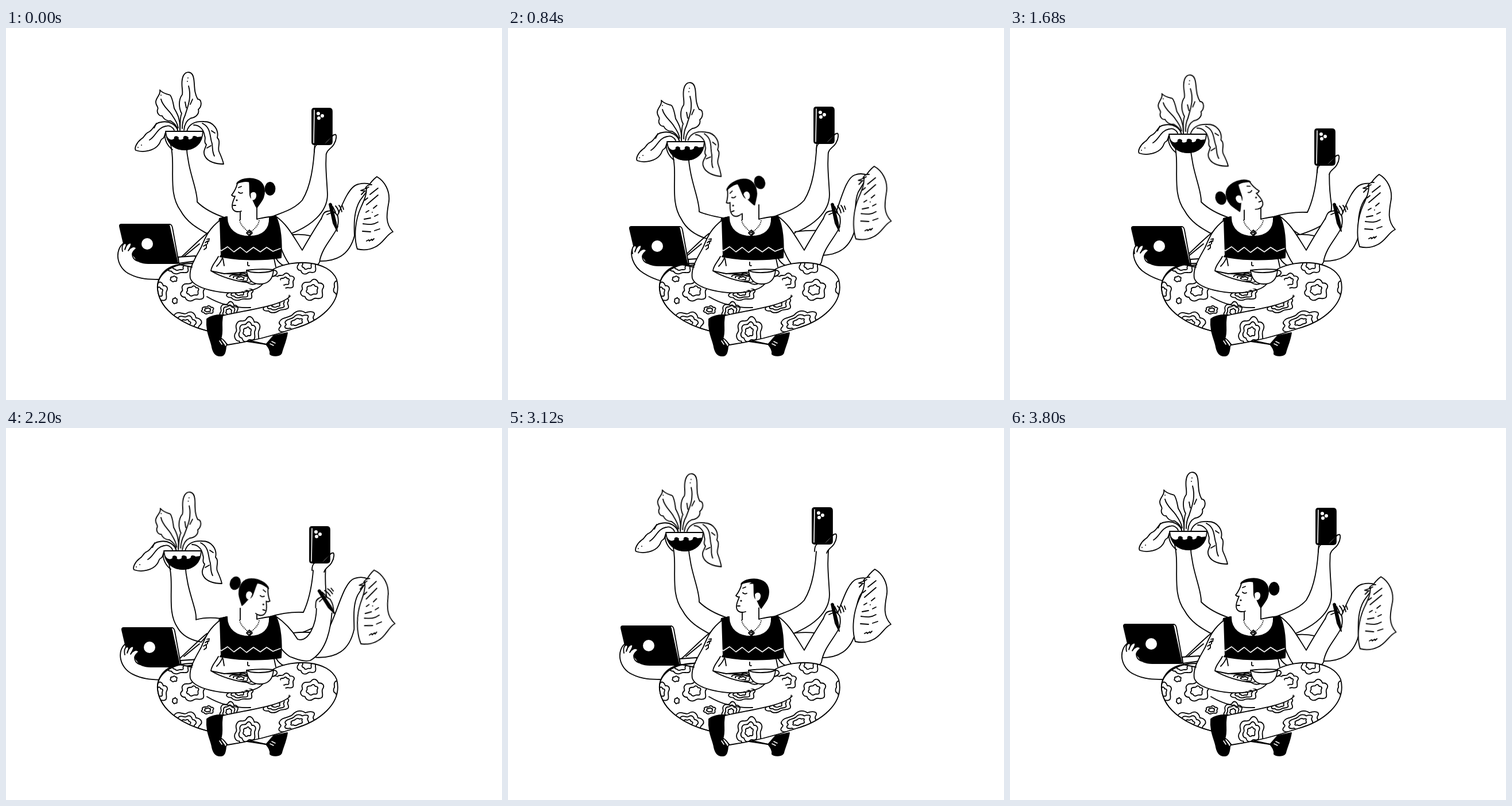
Animation of 864 by 648 pixels, one loop 3.84 s. Source, as an HTML page without scripts:

```html
<!DOCTYPE html>
<html lang="en">
<head>
<meta charset="utf-8">
<title>Six arms at work</title>
<style>
html, body { margin: 0; width: 100%; height: 100%; overflow: hidden; background: #fff; }
svg { display: block; width: 864px; height: 648px; }
path, ellipse, circle { fill: #fff; stroke: #000; stroke-width: 1.8; stroke-linecap: round; stroke-linejoin: round; }
.line { fill: none; }
.ink { fill: #000; }
.skin { stroke: none; }
.chalk { fill: none; stroke: #fff; stroke-width: 1.6; }
#blob { fill: none; vector-effect: non-scaling-stroke; }

.move { animation: 3840ms ease-in-out infinite; }
.plant { animation-name: plant; }
.plant-arm { animation-name: plant-arm; }
.tall { animation-name: tall; transform-origin: 308px 180px; }
.droop { animation-name: droop; transform-origin: 340px 175px; }
.phone { animation-name: phone; }
.phone-arm { animation-name: phone-arm; }
.paper { animation-name: paper; transform-origin: 640px 268px; }
.paper-arm { animation-name: paper-arm; }
.laptop { animation-name: laptop; }
.laptop-arm { animation-name: laptop-arm; }
.pen { animation-name: pen; transform-origin: 571px 330px; }
.pen-arm { animation-name: pen-arm; }
.head { animation-name: head; transform-origin: 421px 330px; }
.bun { animation-name: bun; }
.left { animation-name: left; animation-timing-function: step-end; }
.right { animation-name: right; animation-timing-function: step-end; }

:root {
  --plant-up: path("M286 200C297 240 280 285 304 318C316 340 336 350 350 358L383 331C365 325 345 315 333 303C334 280 316 250 314 200");
  --plant-mid: path("M286 218C297 255 280 300 302 333C312 353 330 362 346 367L380 332C364 329 346 326 333 320C334 298 316 266 314 218");
  --plant-down: path("M283 234C295 272 278 318 299 348C308 364 325 370 340 373L374 332C360 330 345 330 331 334C333 314 314 284 312 234");
  --phone-up: path("M538 200C536 240 531 276 516 300C500 318 478 322 455 332L497 358C530 345 560 322 560 290C559 262 555 240 559 205");
  --phone-down: path("M536 236C534 272 528 300 518 321C500 320 478 323 458 329L505 360C535 350 562 340 560 308C557 288 555 268 557 240");
  --paper-low: path("M500 360C525 358 542 364 556 371C575 345 590 276 614 272C622 270 630 270 637 273L617 300C606 318 606 340 607 362C598 396 575 408 540 406");
  --paper-high: path("M500 355C525 352 542 352 556 354C575 328 584 262 604 256C612 253 621 254 627 257L610 286C602 306 607 328 606 344C598 384 575 397 540 396");
  --laptop-out: path("M206 374C188 386 192 418 216 429C234 438 250 438 268 438");
  --laptop-in: path("M220 380C209 392 218 416 236 427C247 434 257 438 268 441");
  --pen-rest: path("M470 328C490 342 500 362 516 387C530 362 541 345 553 326L578 346C570 365 550 382 546 408C540 422 500 420 494 412C488 404 482 392 478 380");
  --pen-up: path("M470 328C485 338 498 352 508 368C526 374 541 344 541 311L568 318C566 346 560 388 530 405C518 408 505 402 494 398C488 394 482 388 478 382");
}
@keyframes plant {
  0%, 13%, 100% { transform: none; }
  22% { transform: translate(-1px, 18px); }
  31%, 44% { transform: translate(-1px, 5px); }
  57.5% { transform: translate(-3px, 34px); }
  67.5% { transform: translate(-3px, 20px); }
  76%, 82% { transform: translate(-3px, 2px); }
}
@keyframes plant-arm {
  0%, 13%, 31%, 44%, 76%, 100% { d: var(--plant-up); }
  22%, 67.5% { d: var(--plant-mid); }
  57.5% { d: var(--plant-down); }
}
@keyframes tall {
  0%, 22%, 100% { transform: none; }
  43% { transform: rotate(-2deg); }
  57% { transform: rotate(3deg); }
  67% { transform: rotate(-1deg); }
  81% { transform: rotate(3deg); }
}
@keyframes droop {
  0%, 57%, 100% { transform: none; }
  22% { transform: rotate(6deg); }
  43% { transform: rotate(-2deg); }
  67%, 81% { transform: rotate(4deg); }
}
@keyframes phone {
  0%, 100% { transform: none; }
  22%, 28% { transform: translateY(-2px); }
  42% { transform: translate(-2px, 36px); }
  57.3% { transform: translate(-4px, 32px); }
  66.7% { transform: translate(-4px, -3px); }
  82% { transform: translate(-3px, -1px); }
}
@keyframes phone-arm {
  0%, 28%, 66.7%, 100% { d: var(--phone-up); }
  42%, 57.3% { d: var(--phone-down); }
}
@keyframes paper {
  0%, 100% { transform: none; }
  22% { transform: translate(-8px, -18px) rotate(-1deg); }
  43.75% { transform: translate(-3px, -4px); }
  57.3% { transform: translate(-4px, -11px) rotate(-5deg); }
  66.7% { transform: translate(-10px, -20px) rotate(-4deg); }
  81.25% { transform: translate(-7px, -13px); }
  98% { transform: rotate(2deg); }
}
@keyframes paper-arm {
  0%, 44%, 98%, 100% { d: var(--paper-low); }
  22%, 67% { d: var(--paper-high); }
}
@keyframes laptop {
  0%, 15%, 100% { transform: none; }
  21.5%, 45% { transform: translate(14px, 4px); }
  57.3% { transform: translate(4px, 6px); }
  66.7% { transform: translate(-1px, 6px); }
  81.25% { transform: translate(-1px, 3px); }
}
@keyframes laptop-arm {
  0%, 15%, 63%, 100% { d: var(--laptop-out); }
  21.5%, 45% { d: var(--laptop-in); }
}
@keyframes pen {
  0%, 46%, 66%, 100% { transform: none; }
  54%, 59% { transform: translate(-12px, -27px) rotate(-20deg); }
}
@keyframes pen-arm {
  0%, 46%, 66%, 100% { d: var(--pen-rest); }
  54%, 59% { d: var(--pen-up); }
}
@keyframes head {
  0%, 6%, 100% { transform: none; }
  21.9%, 25% { transform: rotate(-22deg); }
  31% { transform: rotate(-4deg); }
  41%, 45% { transform: rotate(-20deg); }
  57.3% { transform: rotate(18deg); }
  66.7%, 70% { transform: none; }
  81.25% { transform: translate(4px, 1px); }
  90% { transform: none; }
}
@keyframes bun {
  0%, 25%, 89%, 100% { transform: none; }
  38%, 70% { transform: translateX(-78px); }
  81.25% { transform: translateX(-38px); }
}
@keyframes left { 0%, 78% { opacity: 1; } 31% { opacity: 0; } }
@keyframes right { 0%, 78% { opacity: 0; } 31% { opacity: 1; } }
</style>
</head>
<body>
<svg viewBox="0 0 864 648">
  <defs>
    <path id="blob" d="M-18-8C-14-16-6-10-2-14C4-21 10-16 12-11C18-12 24-8 20-2C16 2 22 8 18 13C12 17 8 12 3 15C-4 20-11 17-13 11C-20 11-23 5-19 1C-15-2-20-4-18-8Z"/>
    <g id="rings">
      <use href="#blob"/>
      <use href="#blob" transform="scale(.66)"/>
      <use href="#blob" transform="scale(.32)"/>
    </g>
    <g id="pair">
      <use href="#blob"/>
      <use href="#blob" transform="scale(.5)"/>
    </g>
    <g id="face">
      <path class="skin" d="M403 271L394 310 410 319 435 311 440 270Z"/>
      <path d="M403 271C401 279 397 286 393 291C395 293 397 294 399 293C397 299 394 303 394 310C394 318 400 322 410 319"/>
      <path class="ink" d="M402 271C407 263 424 260 436 264C449 268 453 282 448 296C445 303 440 308 437 313C434 309 432 303 430 299C422 294 426 284 424 268C417 266 409 268 402 271Z"/>
      <path class="skin" d="M426 289C430 283 437 286 436 293C435 299 431 301 427 299Z"/>
      <path class="line" d="M405 286Q408 289 412 287M405 278L410 276M396 309H400"/>
      <circle class="ink" cx="402" cy="300" r=".7"/>
    </g>
    <path id="thigh" d="M302 412C274 416 262 438 264 455C268 494 312 518 352 528L453 551 480 520 500 440 440 424 380 428Z"/>
    <path id="shin" d="M466 420C500 402 562 404 576 438C587 480 545 512 500 524C460 538 420 547 386 552L374 540 377 501C425 490 480 484 495 467"/>
    <clipPath id="in-thigh"><use href="#thigh"/></clipPath>
    <clipPath id="in-shin"><use href="#shin"/></clipPath>
  </defs>

  <!-- phone -->
  <path class="move phone-arm" d="M538 200"/>
  <g class="move phone">
    <path class="skin" d="M538 196H572L558 219 538 215Z"/>
    <path class="line" d="M542 203C538 205 537 211 537 216M572 186C577 183 576 195 571 203C566 211 561 210 558 219"/>
    <path class="ink" d="M537 140H563Q568 140 568 145V198Q568 203 563 203H537Q533 203 533 199V144Q533 140 537 140Z"/>
    <path class="chalk" d="M537 143L536 200" stroke-width="1"/>
    <circle class="skin" cx="544" cy="149" r="3"/><circle class="skin" cx="551" cy="153" r="3"/><circle class="skin" cx="545" cy="157" r="3"/>
    <path d="M571 186C565 192 558 195 554 203"/>
  </g>

  <!-- plant -->
  <path class="move plant-arm" d="M286 200"/>
  <g class="move plant">
    <path class="line" d="M277 185C276 196 282 206 290 212"/>
    <g class="move tall">
      <path d="M303 178C304 160 299 150 293 140C291 130 290 122 286 117C280 115 273 114 268 108C270 116 262 120 261 128C260 135 267 138 264 142C262 149 268 154 272 153C275 160 282 162 287 162C293 166 298 170 299 178"/>
      <path class="line" d="M270 124C273 137 285 144 290 153C295 160 299 168 300 174"/>
      <path d="M310 178C311 165 316 160 322 157C332 156 337 148 335 142C342 136 341 124 334 124C327 112 329 100 327 88C325 75 314 74 309 83C303 95 309 108 307 116C300 125 301 140 306 149C302 158 304 168 303 178"/>
      <path class="line" d="M318 101C324 122 316 138 312 152C308 160 307 167 307 175M325 124L321 133M312 129L314 139"/>
      <path class="line" d="M317 87V87.1M316 93V93.1M270 117V117.1" stroke-width="2.2"/>
    </g>
    <path d="M300 182C298 168 284 161 270 164C258 165 258 176 249 181C241 184 242 190 236 193C228 199 223 209 226 213C240 218 259 213 266 203C270 199 268 194 274 192C277 189 276 184 279 181"/>
    <path class="line" d="M278 171C263 174 261 189 250 195M279 171C284 169 290 172 293 178M262 166L258 174M236 204V204.1M230 208V208.1"/>
    <g class="move droop">
      <path d="M315 180C318 167 330 162 345 163C362 163 371 178 368 191C375 198 368 208 371 215C375 224 378 231 379 237C365 237 352 233 347 224C342 215 347 211 349 203C343 199 349 193 346 188C345 178 338 169 327 169"/>
      <path class="line" d="M342 166C357 173 355 189 358 198C361 206 358 214 363 223M358 179L364 183M350 209L357 205"/>
    </g>
    <path d="M278 180H343C342 201 329 212 311 212C293 212 280 201 278 180Z"/>
    <path class="ink" d="M280 190C284 196 290 197 294 193C292 189 297 188 300 191C298 196 306 197 310 193C308 188 314 188 317 191C315 196 322 196 326 192C324 188 331 188 333 191L341 190C338 204 325 212 311 212C296 212 284 204 280 190Z"/>
  </g>

  <!-- paper -->
  <path class="move paper-arm" d="M500 360"/>
  <g class="move paper">
    <path d="M646 259C660 267 669 284 667 302C663 324 660 340 674 355C662 360 657 376 642 382C632 387 621 387 612 385C605 363 609 333 618 313C625 298 628 290 628 280C633 272 639 264 646 259Z"/>
    <path class="line" d="M648 279L634 290M648 291L628 308M625 300L630 296M646 309L640 314M632 318L627 321M638 321V321.1M648 325L642 328M635 331L624 333M648 338C638 344 630 342 622 341M651 350L642 353M635 355L621 354M628 371L632 369L633 371L637 368L638 370L641 367"/>
    <path d="M637 273C631 272 627 276 626 280L632 277M626 280L618 283L626 284M624 285L619 290"/>
  </g>

  <!-- laptop -->
  <path class="line" d="M350 358C335 370 318 388 302 402M337 376L310 398"/>
  <path class="move laptop-arm" d="M206 374"/>
  <g class="move laptop">
    <path d="M300 399L330 397V406L301 410Z"/>
    <path d="M282 342H286Q289 343 290 348L301 409H294Z"/>
    <path class="ink" d="M201 342H281Q284 342 285 346L299 410H248C236 410 228 407 225 400L205 376 198 346Q197 342 201 342Z"/>
    <circle class="skin" cx="246" cy="376" r="10"/>
    <path d="M203 389C201 380 204 375 208 375C211 376 209 382 207 386C209 378 214 373 218 375C219 379 215 384 213 388C217 382 223 379 227 383C226 387 221 387 220 394C220 401 224 404 229 406"/>
  </g>

  <!-- torso -->
  <path class="skin" d="M384 329L408 335V310H437V333L470 328 480 400 490 425H375L368 390Z"/>
  <path class="line" d="M408 314V334M437 308V333M372 332L385 329M437 333C447 331 458 328 470 328M377 400C375 406 371 411 367 415M378 402L380 414M467 402L470 416M471 402C475 410 482 414 490 417M421 408C421 412 420 415 424 414"/>
  <path class="line" d="M407 335C409 345 418 351 424 357C432 351 440 344 441 335" stroke-dasharray=".1 3" stroke-width="2"/>
  <path class="move pen-arm" d="M470 328"/>
  <path class="ink" d="M372 332L385 329C385 352 402 363 424 363C447 363 460 351 459 330L470 328C479 345 481 375 479 400C442 406 398 404 367 397C367 375 365 350 372 332Z"/>
  <path class="chalk" d="M368 382L375 388 386 381 397 390 408 382 419 391 431 382 443 390 454 382 465 389 478 384"/>
  <path d="M424 352L429 357 424 362 419 357ZM422 357L425 355 426 358 424 360" stroke-width="1.6"/>

  <!-- pen -->
  <g class="move pen">
    <path d="M549 333C552 325 553 320 561 319C569 317 574 321 578 328C580 338 578 346 575 352"/>
    <path class="line" d="M569 311L574 321M574 310C578 314 579 317 580 322M580 309C583 312 584 316 585 320M586 310L588 316M559 325L566 322"/>
    <path class="ink" d="M563 307Q565 304 567 307L575 339 577 354 570 340Z"/>
  </g>

  <!-- legs -->
  <path class="ink" d="M490 531C488 545 482 557 480 566C477 572 464 572 460 568C461 561 457 556 453 551L468 536Z"/>
  <path class="chalk" d="M460 550L466 553M463 546L469 549"/>
  <use href="#thigh" style="stroke:none" class="skin"/>
  <path class="line" d="M325 410C290 410 262 428 264 455C268 494 312 518 352 528M420 546L453 551M385 428C400 428 412 430 425 433"/>
  <g clip-path="url(#in-thigh)">
    <use href="#pair" transform="translate(325 458)"/>
    <use href="#pair" transform="translate(265 460) scale(.75 1)"/>
    <use href="#pair" transform="translate(300 416) scale(.9 .7)"/>
    <use href="#rings" transform="translate(313 514) rotate(14) scale(1.25 1.2)"/>
    <use href="#pair" transform="translate(351 491) scale(.5 .4)"/>
    <use href="#blob" transform="translate(292 437) scale(.28)"/>
    <use href="#blob" transform="translate(294 475) scale(.2 .3)"/>
    <use href="#rings" transform="translate(407 462) scale(1.1 .7)"/>
    <use href="#rings" transform="translate(388 494) scale(.75 1)"/>
    <use href="#rings" transform="translate(408 436) scale(1 .5)"/>
  </g>
  <path class="line" d="M350 468C372 481 398 488 426 487"/>
  <use href="#shin"/>
  <g clip-path="url(#in-shin)">
    <use href="#pair" transform="translate(485 441) scale(.8)"/>
    <use href="#pair" transform="translate(533 456) scale(.95 1.05)"/>
    <use href="#pair" transform="translate(524 412) scale(.8 .95)"/>
    <use href="#blob" transform="translate(581 452) scale(.5 .9)"/>
    <use href="#rings" transform="translate(470 482) rotate(-10) scale(1.1 .75)"/>
    <use href="#rings" transform="translate(506 512) rotate(-16) scale(1.6 1)"/>
    <use href="#rings" transform="translate(420 529) scale(1.05 1.5)"/>
  </g>
  <path class="skin" d="M430 446L466 422 493 464C470 478 450 478 420 478L400 462Z" opacity="0"/>
  <path class="ink" d="M350 507C355 502 368 499 377 500C374 515 379 530 374 541L383 556C382 566 380 571 374 571C365 572 361 565 359 556C357 543 348 530 350 507Z"/>
  <path d="M374 540C379 543 383 548 385 552L382 556Z"/>
  <path class="chalk" d="M372 545L376 551M376 543L380 549"/>

  <!-- cup -->
  <path class="skin" d="M372 334C350 352 322 410 321 436C326 455 375 463 405 461L447 446 420 443 357 424 374 395Z"/>
  <path class="line" d="M374 334C352 350 346 368 340 382C330 400 318 418 321 436C328 455 375 463 405 461C425 459 440 455 447 446M370 398C365 408 358 413 357 423C375 434 400 441 420 443C425 447 433 448 437 444"/>
  <path class="line" d="M345 386L349 383M344 380L349 377 349 383M347 374L351 371 351 376M350 368L354 367 353 372"/>
  <path d="M464 423C471 420 475 427 470 430C468 432 465 433 463 433"/>
  <path d="M419 422C421 439 430 446 442 446C456 446 465 438 466 421Z"/>
  <path d="M419 422Q442 419 466 421C460 427 427 428 419 422Z"/>

  <!-- head -->
  <g class="move head">
    <ellipse class="ink move bun" cx="460" cy="280" rx="8.5" ry="11"/>
    <use class="move left" href="#face"/>
    <use class="move right" href="#face" transform="matrix(-1 0 0 1 842 0)"/>
  </g>
</svg>
</body>
</html>
```
